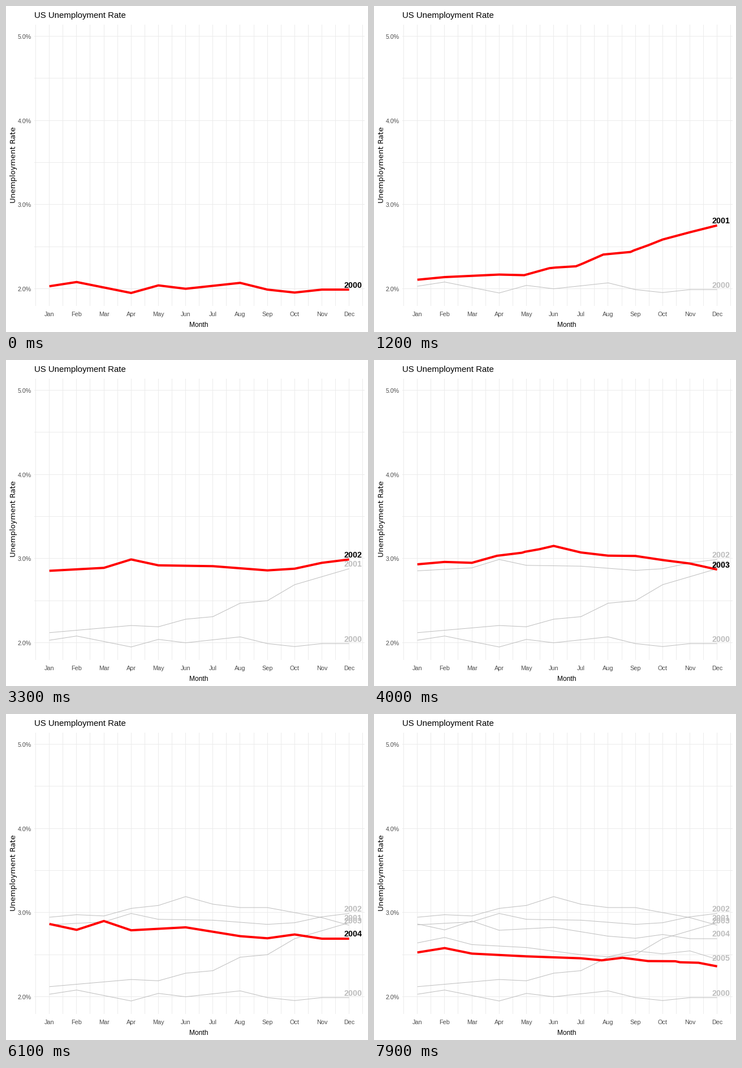
Write a matplotlib script that moves like this. It is 640x576 px and loops after 8 s.

```python
import numpy as np
import matplotlib.pyplot as plt
from matplotlib.animation import FuncAnimation

W, H, DPI = 640, 576, 100
FRAMES, INTERVAL = 80, 100
FIRST_MOVE, CYCLE, MOVE = 6, 14, 7  # in frames

MONTHS = "Jan Feb Mar Apr May Jun Jul Aug Sep Oct Nov Dec".split()
LEFT, RIGHT, TOP, BOTTOM = 50, 634, 33, 530
GREY, GRID, TICK = "#bebebe", "#ebebeb", "#4d4d4d"


def year_rates(**turns):
    """Monthly rates in percent, linear between the turning points."""
    months = [MONTHS.index(m) for m in turns]
    return np.interp(np.arange(12), months, list(turns.values()))


RATES = [
    year_rates(Jan=2.03, Feb=2.08, Apr=1.95, May=2.04, Jun=2.0, Aug=2.07,
               Sep=1.99, Oct=1.955, Nov=1.99),
    year_rates(Jan=2.12, Apr=2.205, May=2.19, Jun=2.28, Jul=2.31, Aug=2.47,
               Sep=2.5, Oct=2.69, Dec=2.88),
    year_rates(Jan=2.855, Mar=2.89, Apr=2.99, May=2.92, Jul=2.91, Sep=2.86,
               Oct=2.88, Nov=2.95, Dec=2.99),
    year_rates(Jan=2.945, Feb=2.975, Mar=2.96, Apr=3.05, May=3.085, Jun=3.19,
               Jul=3.1, Aug=3.06, Sep=3.06, Nov=2.94, Dec=2.85),
    year_rates(Jan=2.865, Feb=2.795, Mar=2.9, Apr=2.79, Jun=2.825, Aug=2.72,
               Sep=2.695, Oct=2.74, Nov=2.69),
    year_rates(Jan=2.64, Feb=2.705, Mar=2.62, May=2.585, Jul=2.5, Aug=2.475,
               Sep=2.545, Oct=2.51, Nov=2.545, Dec=2.445),
    year_rates(Jan=2.375, Feb=2.41, Mar=2.37, May=2.34, Jul=2.4, Oct=2.245,
               Nov=2.29, Dec=2.25),
]


def px(month):
    return 76.7 + 48.18 * np.asarray(month)


def py(rate):
    return 499.6 - 148.7 * (np.asarray(rate) - 2)


def resample(rates):
    """Split every edge in four; the steepest edge takes the spare points."""
    steps = np.full(11, 4)
    steps[np.argmax(np.abs(np.diff(rates)))] += 5
    pos = np.concatenate(
        [i + np.arange(n) / n for i, n in enumerate(steps)] + [[11]])
    return np.column_stack([px(pos), py(np.interp(pos, range(12), rates))])


PATHS = [resample(r) for r in RATES]

fig = plt.figure(figsize=(W / DPI, H / DPI), dpi=DPI, facecolor="white")
ax = fig.add_axes([0, 0, 1, 1])
ax.set(xlim=(0, W), ylim=(H, 0))
ax.axis("off")


def line(x, y, color, width, z):
    return ax.plot(x, y, color=color, lw=width * 72 / DPI, zorder=z,
                   snap=False, solid_capstyle="butt",
                   solid_joinstyle="round")[0]


def text(x, y, s, size, color="black", font="Liberation Sans", **kw):
    return ax.text(x, y, s, fontsize=size * 72 / DPI, color=color,
                   family=font, va=kw.pop("va", "baseline"), **kw)


def year_label(i, color, z):
    return text(613, label_y(PATHS[i][-1, 1]), str(2000 + i), 14.2, color,
                weight="bold", ha="center", zorder=z)


def label_y(end):
    return end - 3.5


def pixel(v):
    return np.floor(v) + 0.5


# Grid and axes
for m in np.arange(-0.5, 12, 0.5):
    line([pixel(px(m))] * 2, [TOP, BOTTOM], GRID, 1, 1)
for r in np.arange(2, 5.1, 0.5):
    line([LEFT, RIGHT], [pixel(py(r))] * 2, GRID, 1, 1)
for m, name in enumerate(MONTHS):
    text(px(m), 548, name, 10.9, TICK, ha="center")
for r in range(2, 6):
    text(44.5, py(r) + 4.4, f"{r}.0%", 10.6, TICK, ha="right")
text(50, 21.5, "US Unemployment Rate", 15)
text(341, 567, "Month", 12, ha="center")
text(20, 281, "Unemployment Rate", 13, font="DejaVu Sans", rotation=90,
     ha="right", va="center")

# Past years, then the current one
past = range(len(RATES) - 1)
old_lines = [line(px(range(12)), py(RATES[i]), GREY, 1, 2) for i in past]
old_labels = [year_label(i, GREY, 4) for i in past]
red = line([], [], "#ff0000", 4, 3)
current = year_label(0, "black", 5)


def update(n):
    k = max(0, (n - FIRST_MOVE) // CYCLE)
    f = float(np.clip((n - FIRST_MOVE - CYCLE * k) / MOVE, 0, 1))
    path = (1 - f) * PATHS[k] + f * PATHS[k + 1]
    red.set_data(path.T)
    end = path[-1, 1]

    leaving = 0 < f < 0.5
    for i in past:
        seen = i < k + (f > 0)
        old_lines[i].set_visible(seen)
        old_labels[i].set_visible(seen)
        # The label being left behind trails the line for a moment
        own = PATHS[i][-1, 1]
        trails = leaving and i == k
        old_labels[i].set_y(label_y((own + end) / 2 if trails else own))

    current.set_visible(not leaving)
    current.set_text(str(2000 + k + (f >= 0.5)))
    current.set_y(label_y(end))
    return [red, current, *old_lines, *old_labels]


anim = FuncAnimation(fig, update, frames=FRAMES, interval=INTERVAL,
                     init_func=lambda: update(0), repeat=True, blit=False)
plt.show()
```
